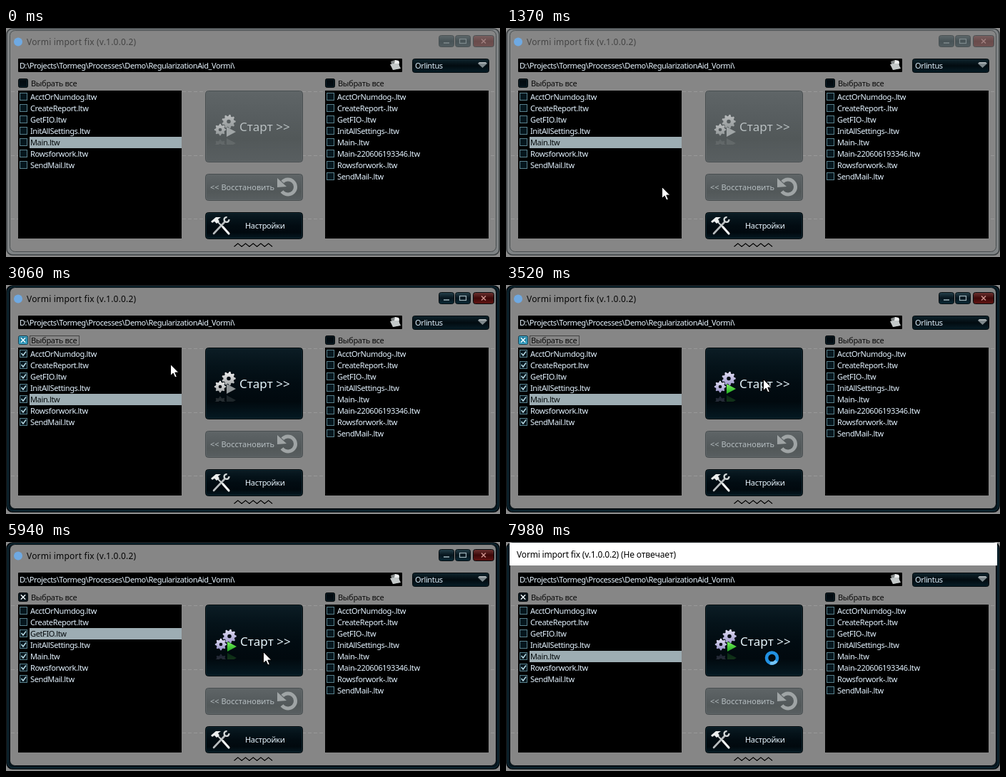
These frames come from a looping animation (692x322 px, 8 s). An HTML page with a canvas:

```html
<!DOCTYPE html>
<html lang="ru">
<head>
<meta charset="utf-8">
<title>Import fix</title>
<style>
html, body { margin: 0; width: 100%; height: 100%; overflow: hidden; background: #868686; }
canvas { display: block; width: 692px; height: 322px; }
</style>
</head>
<body>
<canvas id="stage" width="692" height="322"></canvas>
<script>
const ctx = document.getElementById('stage').getContext('2d');
const LOOP = 8000, STEP = 77, START = 210;
const FONT = '"Noto Sans", "Open Sans", sans-serif';
const FILES = ['AcctOrNumdog', 'CreateReport', 'GetFIO', 'InitAllSettings', 'Main', 'Rowsforwork', 'SendMail'];
const BACKUPS = ['AcctOrNumdog-', 'CreateReport-', 'GetFIO-', 'InitAllSettings-', 'Main-',
  'Main-220606193346', 'Rowsforwork-', 'SendMail-'];
const DONE_AT = [4070, 4470, 5980, 6240];
const T = { hover: 2300, click: 2440, startHover: 3210, press: 3600, run: 3750, hang: 7100 };

// time, x, y of the pointer tip
const PATH = [
  [210, 456, 312], [595, 429, 267], [980, 400, 274], [1365, 219, 224], [1830, 117, 160],
  [2300, 27, 80], [2670, 26, 79], [3059, 231, 112], [3520, 361, 133], [4460, 361, 133],
  [4860, 357, 136], [4930, 356, 137], [5230, 356, 139], [5450, 356, 151], [5650, 356, 151],
  [5900, 361, 155], [5985, 361, 155], [6440, 371, 162]
];

function box(x, y, w, h, r, fill, stroke, width = 1) {
  ctx.beginPath();
  ctx.roundRect(x, y, w, h, r);
  if (fill) { ctx.fillStyle = fill; ctx.fill(); }
  if (stroke) { ctx.strokeStyle = stroke; ctx.lineWidth = width; ctx.stroke(); }
}

function label(str, x, y, color, size = 11, gap = -0.36) {
  ctx.font = `${size}px ${FONT}`;
  ctx.letterSpacing = gap + 'px';
  ctx.fillStyle = color;
  ctx.fillText(str, x, y);
}

function line(points, color, width = 1, close = false) {
  ctx.beginPath();
  points.forEach(([x, y]) => ctx.lineTo(x, y));
  if (close) ctx.closePath();
  ctx.strokeStyle = color;
  ctx.lineWidth = width;
  ctx.stroke();
}

function shape(points, fill) {
  ctx.beginPath();
  points.forEach(([x, y]) => ctx.lineTo(x, y));
  ctx.closePath();
  ctx.fillStyle = fill;
  ctx.fill();
}

function shade(y, h, ...stops) {
  const g = ctx.createLinearGradient(0, y, 0, y + h);
  stops.forEach((c, i) => g.addColorStop(i / (stops.length - 1), c));
  return g;
}

function cross(x, y, r, color, width) {
  line([[x - r, y - r], [x + r, y + r]], color, width);
  line([[x + r, y - r], [x - r, y + r]], color, width);
}

function drawFrame(active) {
  ctx.fillStyle = '#8c8c8c';
  ctx.fillRect(0, 0, 692, 322);
  box(1, 1, 690, 318, 8, active ? '#06151d' : '#7f8385', active ? '#02090d' : '#3d4244', 1.6);
  if (active) box(2.5, 2.5, 687, 315, 7, null, '#143542');
  box(5.5, 3.5, 681, 311, 7, '#868686', active ? '#02090d' : '#484d4f');
  ctx.setLineDash([5, 3]);
  for (const y of [89.5, 179.5, 268.5]) line([[7, y], [685, y]], 'rgba(255,255,255,.15)');
  ctx.setLineDash([]);
}

function drawTitle(active) {
  ctx.beginPath();
  ctx.arc(17, 19.5, 6, 0, 7);
  ctx.fillStyle = '#6fa9e2';
  ctx.fill();
  label('Vormi import fix (v.1.0.0.2)', 29, 24, active ? '#050505' : '#444', 12, 0.2);

  const dark = active ? shade(10, 17, '#28444f', '#07161e', '#0b2b38') : shade(10, 17, '#5f696c', '#485357', '#525d61');
  const red = active ? shade(10, 17, '#713634', '#3d0909', '#651513') : shade(10, 17, '#7b6262', '#694b4b', '#705252');
  const edge = active ? '#060d10' : '#4b5254';
  const ink = active ? '#9fb3bb' : '#7f8a8d';
  box(606.5, 10.5, 21, 16, 3, dark, edge);
  box(629.5, 10.5, 21, 16, 3, dark, edge);
  box(654.5, 10.5, 29, 16, 3, red, edge);
  line([[613, 21], [621, 21]], ink, 1.5);
  ctx.strokeStyle = ink;
  ctx.lineWidth = 1.2;
  ctx.strokeRect(635.5, 15.5, 9, 6);
  cross(669, 18.5, 3, active ? '#cf948f' : '#a08080', 1.5);
}

function drawHungTitle() {
  ctx.fillStyle = '#fff';
  ctx.fillRect(5, 1, 683, 32);
  label('Vormi import fix (v.1.0.0.2) (Не отвечает)', 15, 22, '#000', 12, -0.17);
}

function drawPath() {
  box(17, 43, 538, 19, 1, '#000');
  label('D:\\Projects\\Tormeg\\Processes\\Demo\\RegularizationAid_Vormi\\', 19, 57, '#e8f5ff', 11, -0.42);
  shape([[539, 47], [545, 45], [551, 47], [551, 57], [542, 59]], '#858a8a');
  shape([[538, 51], [549, 49], [553, 57], [542, 59]], '#c3c8c8');
  shape([[545, 45], [550, 46], [551, 50], [544, 50]], '#eceeee');

  box(569.5, 43.5, 107, 19, 3, shade(43, 20, '#0f262f', '#020b10', '#061e28'), '#02080b');
  label('Orlintus', 573, 57, '#e2f3ff');
  shape([[661, 50], [674, 50], [667.5, 56]], '#7d878b');
  shape([[661, 50], [663, 48], [672, 48], [674, 50]], '#aab1b4');
}

function drawSelectAll(x, checked, glow, focus) {
  box(x + 0.5, 71.5, 13, 12, 2, glow ? shade(71, 14, '#1b6f8e', '#2a9cc0') : shade(71, 14, '#02080c', '#051118'),
    glow ? '#0b3444' : '#010405');
  box(x + 1.5, 72.5, 11, 10, 1, null, glow ? '#4bb0d0' : '#0d212a');
  if (checked) cross(x + 7, 77.5, 3.2, '#f2fbff', 1.5);
  label('Выбрать все', x + 18, 82, '#0a0a0a', 11, -0.3);
  if (focus) {
    ctx.setLineDash([1, 1]);
    ctx.strokeStyle = '#000';
    ctx.lineWidth = 1;
    ctx.strokeRect(x + 16.5, 71.5, 69, 13);
    ctx.setLineDash([]);
  }
}

function drawList(x, names, selected, isChecked) {
  const w = 229;
  box(x, 88, w, 208, 0, '#000');
  names.forEach((name, i) => {
    const y = 89 + i * 16;
    if (i === selected) {
      ctx.fillStyle = '#9dadb3';
      ctx.fillRect(x + 16, y, w - 16, 16);
    }
    ctx.strokeStyle = '#58808c';
    ctx.lineWidth = 1;
    ctx.strokeRect(x + 2.5, y + 2.5, 10, 10);
    ctx.fillStyle = '#05161d';
    ctx.fillRect(x + 3, y + 3, 9, 9);
    if (isChecked(i)) line([[x + 4.5, y + 7], [x + 7, y + 10], [x + 11, y + 4.5]], '#b9dbe6', 1.5);
    label(name + '.ltw', x + 17, y + 12, i === selected ? '#050a0c' : '#e4f3ff');
  });
}

function drawButton(y, h, enabled) {
  const fill = enabled
    ? shade(y, h, '#0c1d25', '#05131a', '#020c12', '#01090e', '#051a23')
    : shade(y, h, '#5f6567', '#585e60', '#525859', '#595f61');
  box(279.5, y + 0.5, 136, h - 1, 4, fill, enabled ? '#010608' : '#474d4f');
  box(280.5, y + 1.5, 134, h - 3, 3, null, enabled ? '#10262f' : '#606668');
}

function gear(x, y, r, teeth, color) {
  ctx.beginPath();
  for (let i = 0; i < teeth * 4; i++) {
    const a = (i - 0.5) / (teeth * 4) * Math.PI * 2;
    const d = i % 4 < 2 ? r : r * 0.77;
    ctx.lineTo(x + Math.cos(a) * d, y + Math.sin(a) * d);
  }
  ctx.closePath();
  ctx.moveTo(x + r * 0.28, y);
  ctx.arc(x, y, r * 0.28, 0, 7);
  ctx.fillStyle = color;
  ctx.fill('evenodd');
}

function drawGears(enabled, hot) {
  const top = hot ? '#e4e1f5' : enabled ? '#f0f0f0' : '#b9bcbd';
  const low = hot ? '#9993c9' : enabled ? '#a0a3a5' : '#929798';
  const paint = () => {
    gear(312, 131.5, 9.8, 9, shade(122, 20, top, low));
    gear(300, 143, 8.2, 8, shade(135, 16, top, low));
    shape([[309, 139], [322, 146], [309, 153]], hot ? shade(139, 15, '#7cf05c', '#18a51c') : enabled ? '#8f9496' : '#a0a5a6');
  };
  paint();
  ctx.save();
  ctx.beginPath();
  ctx.rect(290, 155, 36, 9);
  ctx.clip();
  ctx.globalAlpha = 0.2;
  ctx.translate(0, 308);
  ctx.scale(1, -1);
  paint();
  ctx.restore();
}

function drawStart(enabled, hot, pressed) {
  drawButton(88, 101, enabled);
  const d = pressed ? 1 : 0;
  ctx.save();
  ctx.translate(d, d);
  drawGears(enabled, hot);
  label('Старт >>', 327, 145, enabled ? '#e8f6fc' : '#b9c0c2', 17, 0);
  ctx.restore();
}

function drawRestore() {
  drawButton(205, 38, false);
  label('<< Восстановить', 286, 228, '#b6bec1', 11, 0);
  ctx.beginPath();
  ctx.arc(395, 223.5, 10.5, -2.4, 2.5);
  ctx.strokeStyle = '#9fa4a5';
  ctx.lineWidth = 5;
  ctx.stroke();
  shape([[380, 211], [380, 224], [393, 223]], '#9fa4a5');
}

function drawSettings() {
  drawButton(259, 38, true);
  ctx.lineCap = 'round';
  line([[291, 289], [306, 273]], '#b8bcbe', 2.6);
  line([[296, 272], [304, 280]], '#cfd3d4', 2);
  line([[304, 280], [312, 289]], '#f4f5f5', 3.2);
  ctx.lineCap = 'butt';
  ctx.beginPath();
  ctx.arc(309, 269.5, 3.4, -0.1, 4.9);
  ctx.strokeStyle = '#d3d7d8';
  ctx.lineWidth = 2.4;
  ctx.stroke();
  shape([[287, 272], [294, 266], [301, 266], [297, 269], [299, 272], [295, 275], [292, 272], [289, 274]], '#eceeee');
  label('Настройки', 335, 282, '#eaf6ff', 11, -0.3);
}

function drawChevrons() {
  const zigzag = Array.from({ length: 11 }, (_, i) => [319.5 + i * 5.35, i % 2 ? 303 : 307.5]);
  line(zigzag.map(([x, y]) => [x, y + 1]), '#a0a0a0', 1);
  line(zigzag, '#000', 1.3);
}

function pointerAt(t) {
  const q = START + Math.floor((t - START) / STEP) * STEP;
  const i = PATH.findIndex(p => p[0] > q);
  if (i < 0) return PATH[PATH.length - 1].slice(1);
  const [t0, x0, y0] = PATH[i - 1], [t1, x1, y1] = PATH[i];
  const k = (q - t0) / (t1 - t0);
  return [Math.round(x0 + (x1 - x0) * k), Math.round(y0 + (y1 - y0) * k)];
}

function drawPointer(t) {
  if (t < START) return;
  const [px, py] = pointerAt(t);
  const arrow = [[0, 0], [0, 16], [3.7, 12.6], [6.3, 18.5], [8.8, 17.4], [6.3, 11.6], [11.3, 11.6]]
    .map(([x, y]) => [px + x - 0.5, py + y - 0.5]);
  shape(arrow, '#fff');
  line(arrow, '#000', 1, true);
}

function drawSpinner(t) {
  const turn = t < 7810 ? 0 : t < 7980 ? 1 : 2;
  const a = -1.2 + turn * 0.9;
  ctx.lineWidth = 4.6;
  ctx.beginPath();
  ctx.arc(372.5, 163, 7.5, 0, 7);
  ctx.strokeStyle = '#2191e2';
  ctx.stroke();
  ctx.beginPath();
  ctx.arc(372.5, 163, 7.5, a, a + 1.3);
  ctx.strokeStyle = '#74c3f6';
  ctx.stroke();
}

function render(t) {
  const active = t >= T.click;
  const hung = t >= T.hang;
  const done = DONE_AT.filter(d => t >= d).length;
  const selected = t < T.run ? 4 : done;

  drawFrame(active);
  if (hung) drawHungTitle(); else drawTitle(active);
  drawPath();
  drawSelectAll(17, active, t >= T.hover && t < T.press, active && t < T.press);
  drawSelectAll(447, false, false, false);
  drawList(17, FILES, selected, i => active && i >= done);
  drawList(447, BACKUPS, -1, () => false);
  drawStart(active, t >= T.startHover, t >= T.press);
  drawRestore();
  drawSettings();
  drawChevrons();
  if (hung) drawSpinner(t); else drawPointer(t);
}

function tick() {
  render(performance.now() % LOOP);
  requestAnimationFrame(tick);
}
tick();
</script>
</body>
</html>
```
